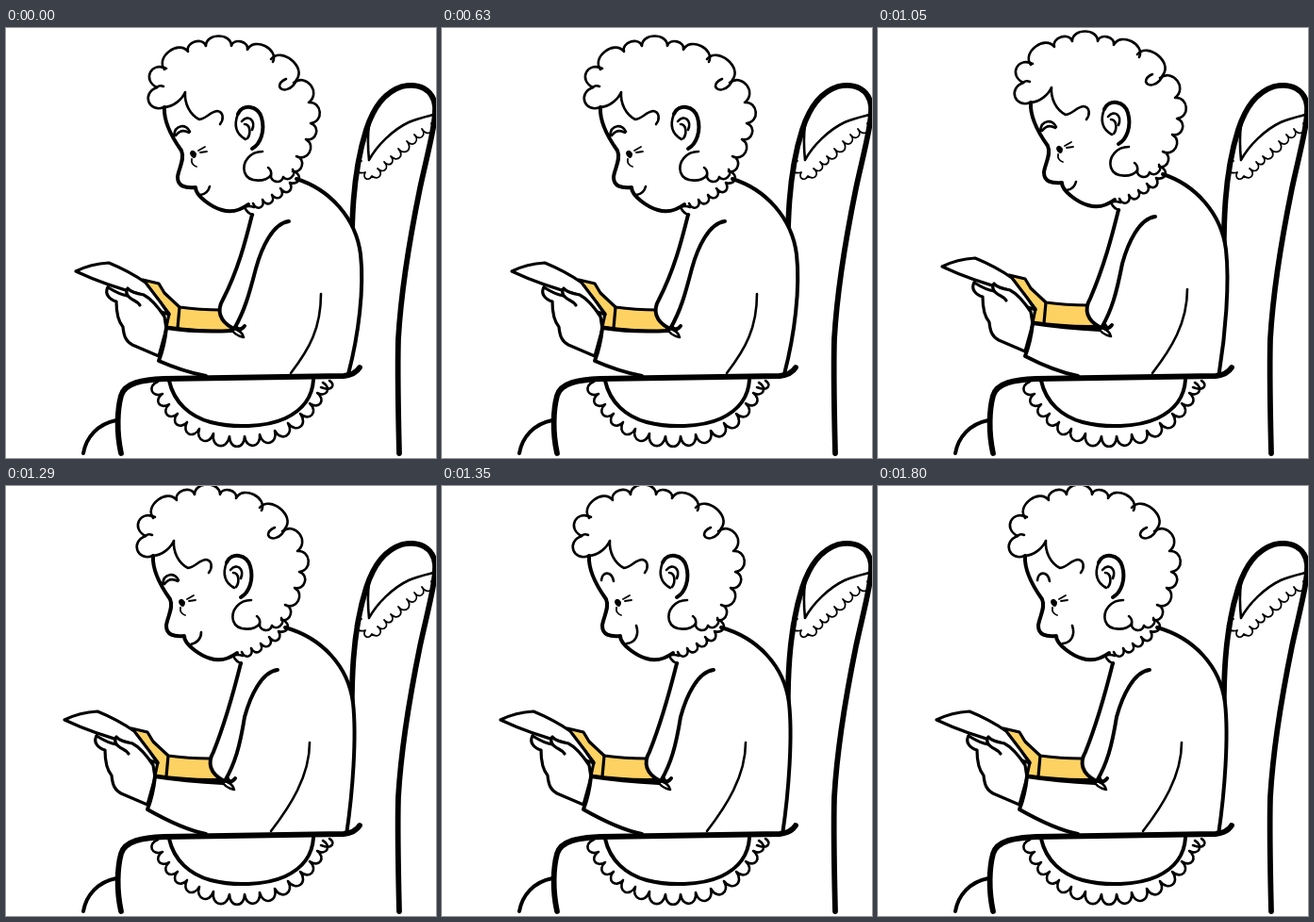
Animation, 456 px wide and 456 px high, one loop 2.1 s. Source, as an HTML page:

```html
<!DOCTYPE html>
<html lang="en">
<head>
<meta charset="utf-8">
<title>Reading in an armchair</title>
<style>
html, body { margin: 0; width: 100%; height: 100%; overflow: hidden; background: #fff; }
svg { display: block; width: 100vw; height: 100vh; }
path { fill: none; stroke: #000; stroke-width: 2.6; stroke-linecap: round; stroke-linejoin: round; }
.thin { stroke-width: 1.8; }
.bold { stroke-width: 4; }
.heavy { stroke-width: 5.8; }
.white { fill: #fff; }
.clear { stroke: none; }
.gold { fill: #fdd262; }
.ink { fill: #000; stroke: none; }
#hands path { stroke-width: 3.2; }
</style>
</head>
<body>
<svg viewBox="0 0 456 456">
  <g id="chair"></g>
  <g id="body"></g>
  <g id="hands"></g>
  <g id="sleeve"></g>
  <g id="head"></g>
  <g id="face"></g>
  <g id="seat"></g>
</svg>
<script>
const layer = id => document.getElementById(id);
const path = (d, cls = '') => `<path class="${cls}" d="${d}"/>`;

// Chain of bumps through the cusps; positive depth bulges to the left of travel.
function scallops(points, depth) {
  const cusps = points.split(' ').map(p => p.split(',').map(Number));
  return cusps.map(([x, y], i) => {
    if (!i) return `M${x},${y}`;
    const [px, py] = cusps[i - 1];
    const nx = (y - py) * depth, ny = (px - x) * depth;
    return `C${px + nx},${py + ny} ${x + nx},${y + ny} ${x},${y}`;
  }).join('');
}

layer('chair').innerHTML =
  path('M367,262C366,210 367,155 382,108C389,86 401,68 420,62C438,58 453,65 455,83C456,102 446,137 439,170C428,224 419,277 416,330C415,366 416,410 417,451', 'heavy') +
  path('M385,103C383,117 384,130 385,140C393,125 410,108 427,100C436,96 445,94 453,92') +
  path(scallops('377,141 381,153 388,157 394,149 401,142 408,136 416,128 425,120 433,113 441,107 451,101', -0.9), 'thin');

layer('seat').innerHTML =
  path('M122,451C117,428 118,405 122,390C126,376 145,373 168,372L358,369C367,368 372,365 375,360', 'heavy') +
  path('M82,451C85,434 97,420 117,416', 'bold') +
  path('M173,374C178,397 195,412 217,418C240,424 274,424 296,414C315,405 325,391 326,373', 'bold') +
  path(scallops('161,375 166,388 173,399 182,409 192,418 205,425 220,430 237,433 253,433 269,431 285,427 299,419 312,409 322,398 330,387 336,376', -0.9)) +
  path('M334,381C346,386 350,378 343,374');

layer('head').innerHTML =
  path('M168,84C167,99 176,116 186,130C190,139 183,149 182,158C182,168 190,170 201,169C201,178 218,190 229,193C239,196 249,193 257,187', 'bold') +
  path(scallops('168,84 160,63 170,43', 0.8)) +
  path(scallops('168,44 193,25 212,19 239,19 256,23 283,36', 0.52)) +
  path(scallops('281,33 308,55', 0.5)) +
  path(scallops('305,58 321,79 323,101 318,118 308,136 304,152', 0.65)) +
  path(scallops('304,150 294,158 281,156', 0.6)) +
  path('M160,63Q163,60 167,62M308,55C304,66 292,68 290,62Q290,57 297,54') +
  path('M272,131C259,131 250,142 253,153C257,165 277,163 281,156Q282,151 278,148') +
  path('M167,84C178,84 187,75 190,68C189,80 195,92 205,97C213,96 216,89 224,88C231,89 231,97 227,102') +
  path('M246,91C251,80 267,82 271,95C275,109 270,123 261,128', 'bold') +
  path('M246,91C241,104 245,113 254,118M250,99C257,91 265,98 261,108M253,102C259,102 260,112 256,117') +
  path(scallops('305,152 301,164 291,170 282,177 272,182 262,186', 0.85)) +
  path('M252,190Q258,188 263,190M253,190Q256,197 262,198');

const eye = path('M204,130L211,126M206,132L213,131', 'thin') +
  path('M195,132Q198,127 202,133Q202,138 199,138Q195,136 195,132Z', 'ink') +
  path('M197,139Q196,145 202,147', 'thin');
const raisedBrow = path('M178,115C179,101 192,102 195,110M180,114Q186,106 194,111');
const calm = eye + raisedBrow + path('M206,177Q214,176 216,168');
const pleased = eye + raisedBrow + path('M208,178Q219,175 219,165');
const smiling = eye + path('M181,110C182,100 192,100 194,111') +
  path('M208,177C218,176 221,167 218,158');

layer('hands').innerHTML =
  path('M145,267L162,271L168,281L184,296Q205,299 229,299L248,321Q211,323 170,317L173,303Z', 'gold') +
  path('M184,296L182,318') +
  path('M74,258Q90,250 109,249Q131,258 148,270L164,291L173,304L162,300L145,283Q106,273 74,258Z', 'white') +
  path('M108,275C104,282 110,288 117,290C117,303 119,311 124,317C125,327 127,332 134,336L162,348L170,319L168,306Q156,288 146,283Q133,281 129,276C126,280 128,285 136,289Q140,291 142,294', 'white') +
  path('M108,275Q121,283 129,284');

// shift: head and hands; elbow: crook of the arm; back: spine; fold: lower end of the sleeve crease.
const poses = [
  { shift: [0, 0], elbow: [0, 0], back: 0, fold: 302, face: calm },
  { shift: [-6, -5], elbow: [-5, -1], back: -7, fold: 291, face: calm },
  { shift: [-12, -10], elbow: [-10, -6], back: -8, fold: 281, face: pleased },
  { shift: [-12, -10], elbow: [-10, -6], back: -8, fold: 281, face: smiling }
];

function drawPose({ shift, elbow, back, fold, face }) {
  const moved = ([dx, dy]) => (x, y) => `${x + dx},${y + dy}`;
  const s = moved(shift), e = moved(elbow), b = moved([back, shift[1]]);
  const chest = `${s(261, 198)}C${s(254, 226)} ${s(246, 257)} ${e(230, 288)}C${e(223, 300)} ${e(227, 311)} ${e(240, 318)}`;
  const spine = `${s(308, 160)}C${b(343, 171)} ${b(371, 201)} ${b(376, 240)}C${b(380, 276)} ${374 + back * .8},325 ${363 + back * .2},367`;
  const cuff = `${s(170, 318)}Q${s(168, 337)} ${s(162, 353)}Q187,364 212,369`;

  for (const id of ['head', 'face', 'hands'])
    layer(id).setAttribute('transform', `translate(${shift})`);
  layer('face').innerHTML = face;
  layer('body').innerHTML =
    path(`M${spine}L225,368L${e(239, 317)}L${s(261, 198)}Z`, 'white clear') +
    path(`M${spine}`, 'bold');
  layer('sleeve').innerHTML =
    path(`M${chest}L${e(243, 319)}C${e(255, 281)} ${s(265, 220)} ${s(300, 205)}Z`, 'white clear') +
    path(`M${chest}Q${e(249, 322)} ${e(253, 316)}`, 'bold') +
    path(`M${e(238, 318)}Q${e(250, 320)} ${e(252, 328)}Q${e(242, 326)} ${e(238, 318)}`, 'white') +
    path(`M${s(300, 205)}C${s(283, 207)} ${s(271, 233)} ${s(265, 255)}C${e(258, 282)} ${e(253, 300)} ${e(242, 319)}`, 'bold') +
    path(`M${s(170, 318)}Q${s(202, 323)} ${e(240, 321)}`, 'bold') +
    path(`M${cuff}`, 'bold') +
    path(`M${s(334, 282)}C${s(334, 318)} ${fold + 20},340 ${fold},366`);
}

let shown = -1;
function update(now) {
  const t = now % 2100;
  const index = t < 1050 ? 0 : t < 1200 ? 1 : t < 1350 ? 2 : 3;
  if (index !== shown) drawPose(poses[shown = index]);
}

const start = performance.now();
function tick() {
  update(performance.now() - start);
  requestAnimationFrame(tick);
}
tick();
</script>
</body>
</html>
```
